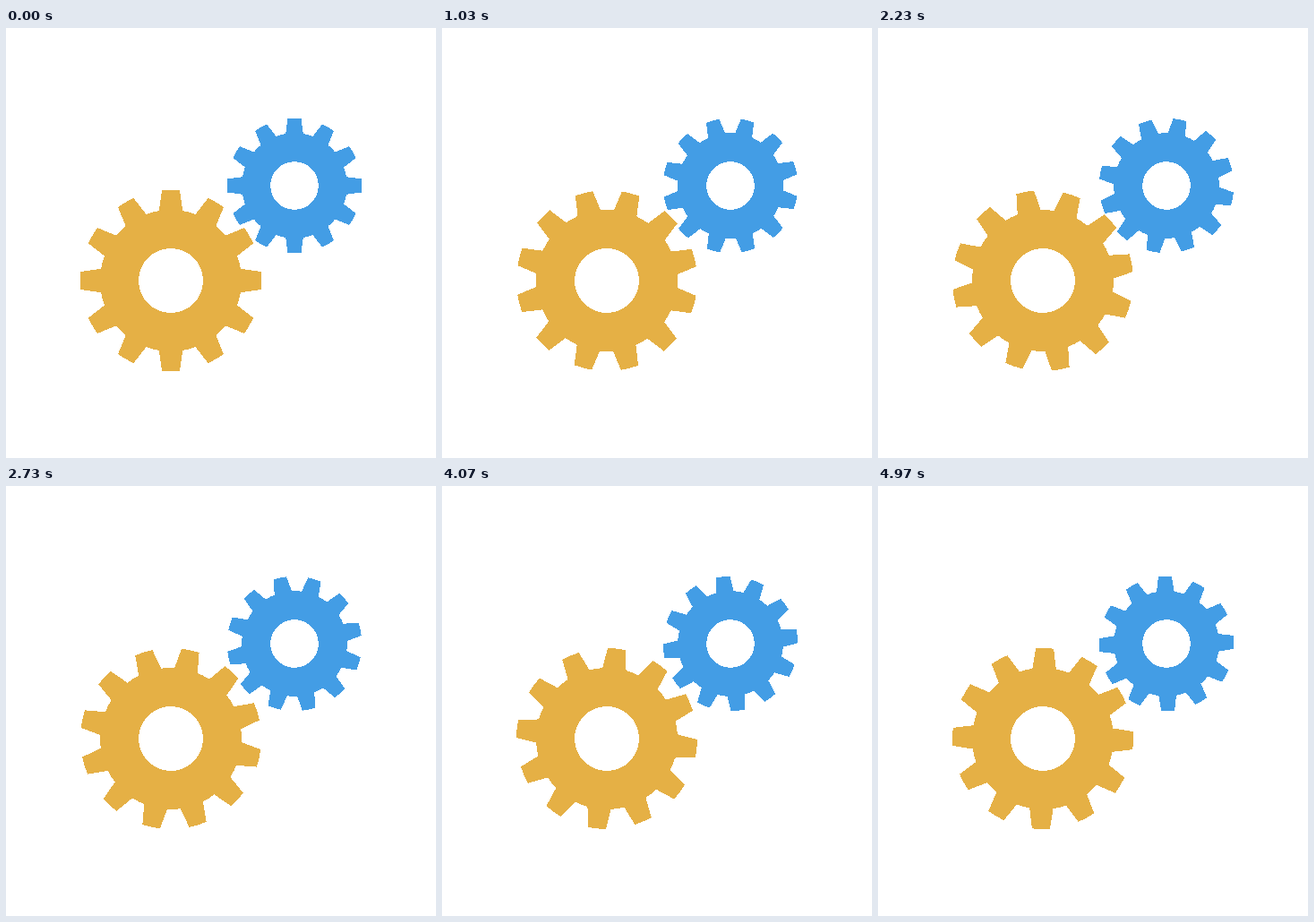
An HTML page for the animation above (5.01 s loop, 480x480 px).

```html
<!DOCTYPE html>
<html lang="en">
<head>
<meta charset="utf-8">
<title>Gears</title>
<style>
  html, body { margin: 0; width: 100%; height: 100%; overflow: hidden; background: #fff; }
  svg { display: block; width: 100%; height: 100%; }
</style>
</head>
<body>
<svg viewBox="0 0 480 480" shape-rendering="crispEdges" fill-rule="evenodd">
  <path id="large" fill="#e5b045"/>
  <path id="small" fill="#439de5"/>
</svg>
<script>
const LOOP = 5010, STEP = 100 / 3, STEPS = 150, TURN = 360 / 149.5;
const TEETH = 12, TIP = 5.7, BASE = 9.6;   // half angles of a tooth, in degrees

const large = document.getElementById('large');
const small = document.getElementById('small');

function gearPath(scale) {
  const outer = 101 * scale, body = 79 * scale, hole = 36 * scale;
  const at = (r, deg) => {
    const a = deg * Math.PI / 180;
    return `${(r * Math.sin(a)).toFixed(3)},${(-r * Math.cos(a)).toFixed(3)}`;
  };
  const arc = (r, deg) => `A${r},${r} 0 0 1 ${at(r, deg)}`;
  let d = `M${at(body, -BASE)}`;
  for (let i = 0; i < TEETH; i++) {
    const a = i * 360 / TEETH;
    d += `L${at(outer, a - TIP)}${arc(outer, a + TIP)}L${at(body, a + BASE)}`;
    d += arc(body, a + 360 / TEETH - BASE);
  }
  return `${d}ZM${at(hole, 0)}${arc(hole, 180)}${arc(hole, 360)}Z`;
}

large.setAttribute('d', gearPath(1));
small.setAttribute('d', gearPath(0.745));

function place(gear, x, y, angle) {
  gear.setAttribute('transform', `translate(${x} ${y}) rotate(${angle})`);
}

function draw(time) {
  // The small offset makes steps start on times rounded to 10 ms.
  const step = Math.min(STEPS - 1, Math.floor((time % LOOP + 3.4) / STEP));
  const angle = step * TURN;
  place(large, 184, 282, -angle);
  place(small, 322, 176, angle);
}

const start = performance.now();
function tick() {
  draw(performance.now() - start);
  requestAnimationFrame(tick);
}
tick();
</script>
</body>
</html>
```
